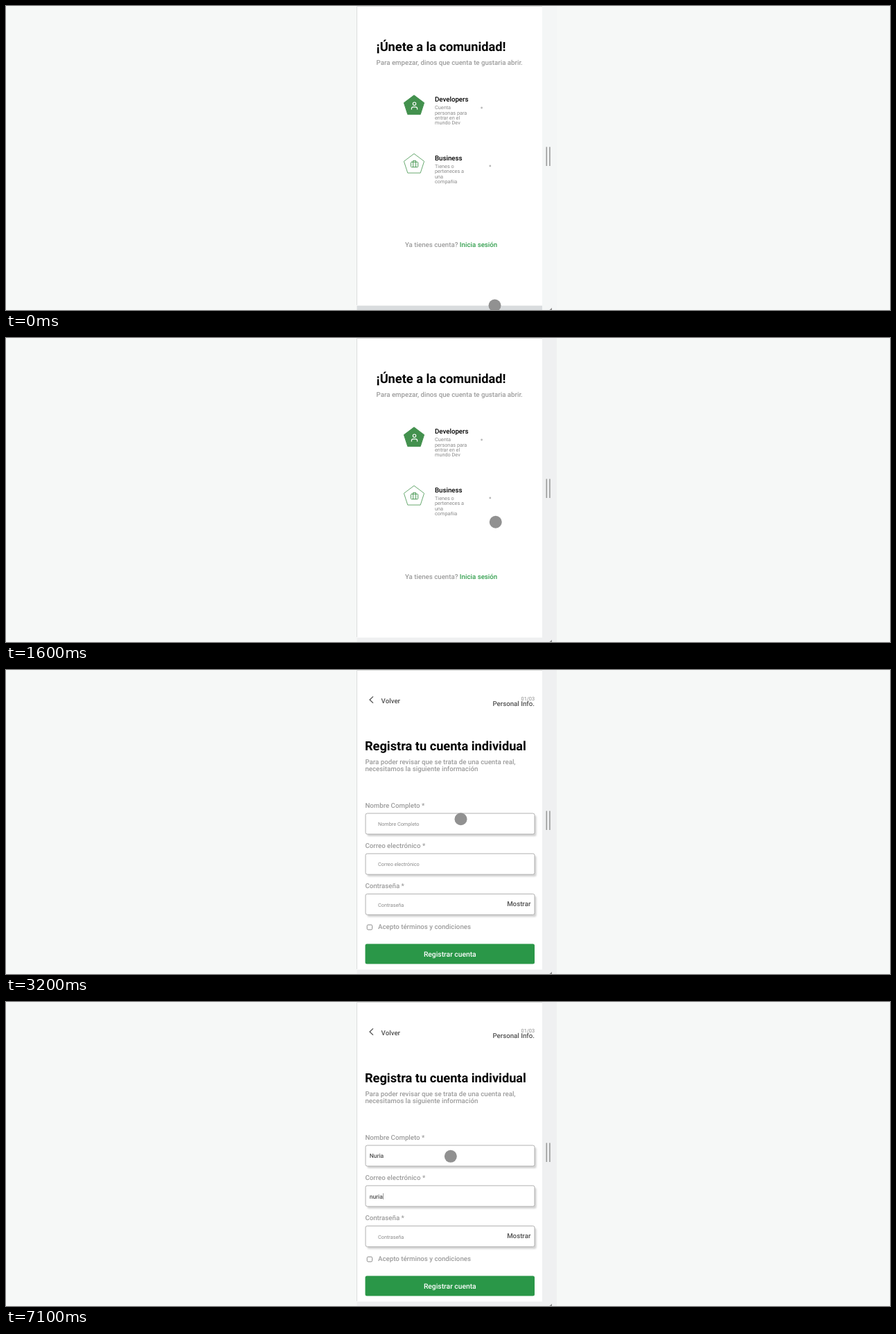
An HTML page that plays this animation: 1276x439 px, repeating every 8 s.

```html
<!DOCTYPE html>
<html lang="es">
<head>
<meta charset="utf-8">
<title>Registro</title>
<style>
  html, body { margin: 0; width: 100%; height: 100%; overflow: hidden; background: #f6f8f7; }
  svg { display: block; width: 100%; height: 100%; }
  text { font-family: Roboto, Arial, sans-serif; font-size: 9.7px; font-weight: 500; text-rendering: geometricPrecision; }
  .title { font-size: 18.2px; font-weight: 700; fill: #000; }
  .grey { fill: #9c9c9c; }
  .dark { fill: #505050; }
  .green { fill: #35a050; }
  .small { font-size: 7.3px; font-weight: 400; fill: #8a8a8a; }
  .typed { font-size: 8.49px; fill: #505050; }
  .button { font-size: 10.3px; fill: #fff; }
  .line { fill: none; stroke-linecap: round; stroke-linejoin: round; }
</style>
</head>
<body>
<svg id="stage" viewBox="0 0 1276 439" xmlns="http://www.w3.org/2000/svg">
  <defs>
    <filter id="soft" x="-5%" y="-30%" width="110%" height="170%"><feGaussianBlur stdDeviation="1.3"/></filter>
    <path id="pentagon" d="M589 128.8 603.6 139.8 598.2 156.6H579.8L574.4 139.8Z"/>
  </defs>

  <rect id="side" x="774" y="0" width="21" height="439"/>
  <rect id="foot" x="506.5" y="432.5" width="267.5" height="6.5"/>
  <rect x="506" y="0" width="268" height="432.5" fill="#fff"/>
  <path d="M506.5 432V.5H774" fill="none" stroke="#dcdedd"/>
  <path d="M780.3 203.5v27.5M784.9 203.5v27.5" stroke="#9a9a9a" stroke-width="1.6"/>
  <path d="M784.5 439 788 435.8V439Z" fill="#8c8c8c"/>

  <g id="welcome">
    <text class="title" x="534.5" y="64.5">¡Únete a la comunidad!</text>
    <text class="grey" x="534.6" y="84.5">Para empezar, dinos que cuenta te gustaria abrir.</text>
    <use href="#pentagon" fill="#43914e" stroke="#43914e"/>
    <g class="line" stroke="#fff" stroke-width="1.1">
      <circle cx="589.5" cy="141.2" r="2.2"/>
      <path d="M585.3 149.3v-.8q0-2.6 2.6-2.6h3.2q2.6 0 2.6 2.6v.8"/>
    </g>
    <use href="#pentagon" y="84.5" fill="#fff" stroke="#68a970"/>
    <g class="line" stroke="#4c9a57">
      <rect x="584.5" y="225.3" width="10.2" height="7.4" rx="1"/>
      <path d="M587.6 232.5v-9.2h4v9.2"/>
    </g>
    <circle cx="686.6" cy="147" r="1.4" fill="#b8b8b8"/>
    <circle cx="698.8" cy="231" r="1.4" fill="#b8b8b8"/>
    <text x="576" y="348" class="grey" xml:space="preserve">Ya tienes cuenta? <tspan class="green">Inicia sesión</tspan></text>
  </g>

  <g id="form">
    <path class="line" d="M529.6 38.6 525 43 529.6 47.4" stroke="#505050" stroke-width="1.3"/>
    <text class="dark" x="541.6" y="47.7">Volver</text>
    <text class="small" x="763" y="44" text-anchor="end">01/03</text>
    <text class="dark" x="763" y="52.3" text-anchor="end">Personal Info.</text>
    <text class="title" x="518" y="116">Registra tu cuenta individual</text>
    <text class="grey" x="518.4" y="136">Para poder revisar que se trata de una cuenta real,</text>
    <text class="grey" x="518.4" y="145.6">necesitamos la siguiente información</text>
    <g id="fields"></g>
    <text class="dark" x="757.3" y="341.3" text-anchor="end">Mostrar</text>
    <rect x="521.2" y="368" width="7.4" height="7" rx="1.6" fill="#fff" stroke="#8c8c8c"/>
    <text class="grey" x="537" y="373.6">Acepto términos y condiciones</text>
    <rect x="518.5" y="395.5" width="244.5" height="29" rx="2.5" fill="#2a9748"/>
    <text class="button" x="640.8" y="413.6" text-anchor="middle">Registrar cuenta</text>
    <rect id="caret" x="525.4" width="0.8" height="9" fill="#858585"/>
    <path id="bars" class="line" d="M768.6 5V321M510 429.4H760" stroke="#9c9c9c" stroke-width="2"/>
  </g>

  <circle id="dot" r="9" fill="#919191"/>
</svg>

<script>
const LOOP = 8000, STEP = 100;
const $ = id => document.getElementById(id);

function add(parent, tag, attrs, text = '') {
  const el = document.createElementNS('http://www.w3.org/2000/svg', tag);
  for (const key in attrs) el.setAttribute(key, attrs[key]);
  el.textContent = text;
  parent.append(el);
  return el;
}

function addLines(y, heading, lines) {
  add($('welcome'), 'text', { x: 619, y }, heading);
  lines.forEach((line, i) =>
    add($('welcome'), 'text', { class: 'small', x: 619, y: y + 11.4 + i * 7.3 }, line));
}
addLines(138, 'Developers', ['Cuenta', 'personas para', 'entrar en el', 'mundo Dev']);
addLines(222.5, 'Business', ['Tienes o', 'perteneces a', 'una', 'compañia']);

const fields = ['Nombre Completo', 'Correo electrónico', 'Contraseña'].map((label, i) => {
  const y = 207 + i * 58.2, g = $('fields');
  const box = { x: 519, y, width: 244, height: 30, rx: 2.5 };
  add(g, 'text', { class: 'grey', x: 518.4, y: y - 8.3 }, label + ' *');
  add(g, 'rect', { ...box, x: 521.5, y: y + 3, fill: '#d2d2d2', filter: 'url(#soft)' });
  add(g, 'rect', { ...box, fill: '#fff', stroke: '#b0b0b0' });
  return {
    y,
    hint: add(g, 'text', { class: 'small', x: 537, y: y + 18.2 }, label),
    value: add(g, 'text', { class: 'typed', x: 524.7, y: y + 18.4 })
  };
});

// Pointer path: time, x, y
const path = [
  [0, 705.5, 432.5], [100, 765, 400], [200, 900, 335], [300, 1012.5, 292], [400, 993, 287.5], [500, 993, 287.5],
  [600, 955, 288], [700, 858, 292], [800, 768, 298], [900, 730, 301.5], [1000, 730, 301.5],
  [1200, 716, 258], [1400, 705.5, 226.5], [1500, 705.5, 226.5],
  [1700, 708, 305], [1900, 702, 349], [2200, 665.5, 213], [2400, 659, 169],
  [2600, 651, 156], [2700, 650, 155.5], [3100, 656, 210], [3300, 657, 220.5], [3400, 657, 220.5],
  [3500, 649, 222.5], [3600, 649, 222.5], [3800, 646, 223], [3900, 646, 223], [4000, 641.8, 222.8]
];

// Times at which each letter is typed
const typing = [
  { word: 'Nuria', times: [4600, 4800, 5000, 5200, 5200] },
  { word: 'nuria', times: [6800, 6900, 7000, 7100, 7100] }
];

const ramp = (t, a, b) => Math.min(1, Math.max(0, (t - a) / (b - a)));

function pointer(t) {
  const next = path.findIndex(p => p[0] > t);
  if (next < 0) return path[path.length - 1].slice(1);
  const a = path[next - 1], b = path[next], k = ramp(t, a[0], b[0]);
  return [1, 2].map(i => a[i] + (b[i] - a[i]) * k);
}

function shade(from, to, k) {
  return `rgb(${from.map((v, i) => Math.round(v + (to[i] - v) * k))})`;
}

function draw(time) {
  const t = Math.floor(time / STEP) * STEP;
  const [x, y] = pointer(t);
  $('dot').setAttribute('transform', `translate(${x} ${y})`);
  $('foot').setAttribute('fill', shade([217, 220, 222], [239, 240, 241], ramp(t, 0, 200)));
  $('side').setAttribute('fill', shade([244, 246, 246], [239, 240, 241], ramp(t, 700, 900)));

  const onForm = t >= 2600;
  $('welcome').style.display = onForm ? 'none' : '';
  $('form').style.display = onForm ? '' : 'none';
  $('bars').setAttribute('opacity', 1 - ramp(t, 2900, 3200));

  typing.forEach(({ word, times }, i) => {
    const count = times.filter(at => at <= t).length;
    fields[i].value.textContent = word.slice(0, count);
    fields[i].hint.style.display = count ? 'none' : '';
  });

  const active = fields[t < 5500 ? 0 : 1];
  const filled = active.value.textContent;
  $('caret').style.display = t >= 3800 ? '' : 'none';
  $('caret').setAttribute('x', filled && onForm ? 524.9 + active.value.getComputedTextLength() : 525.4);
  $('caret').setAttribute('y', active.y + 11);
}

const start = performance.now();
function tick() {
  draw((performance.now() - start) % LOOP);
  requestAnimationFrame(tick);
}
tick();
</script>
</body>
</html>
```
